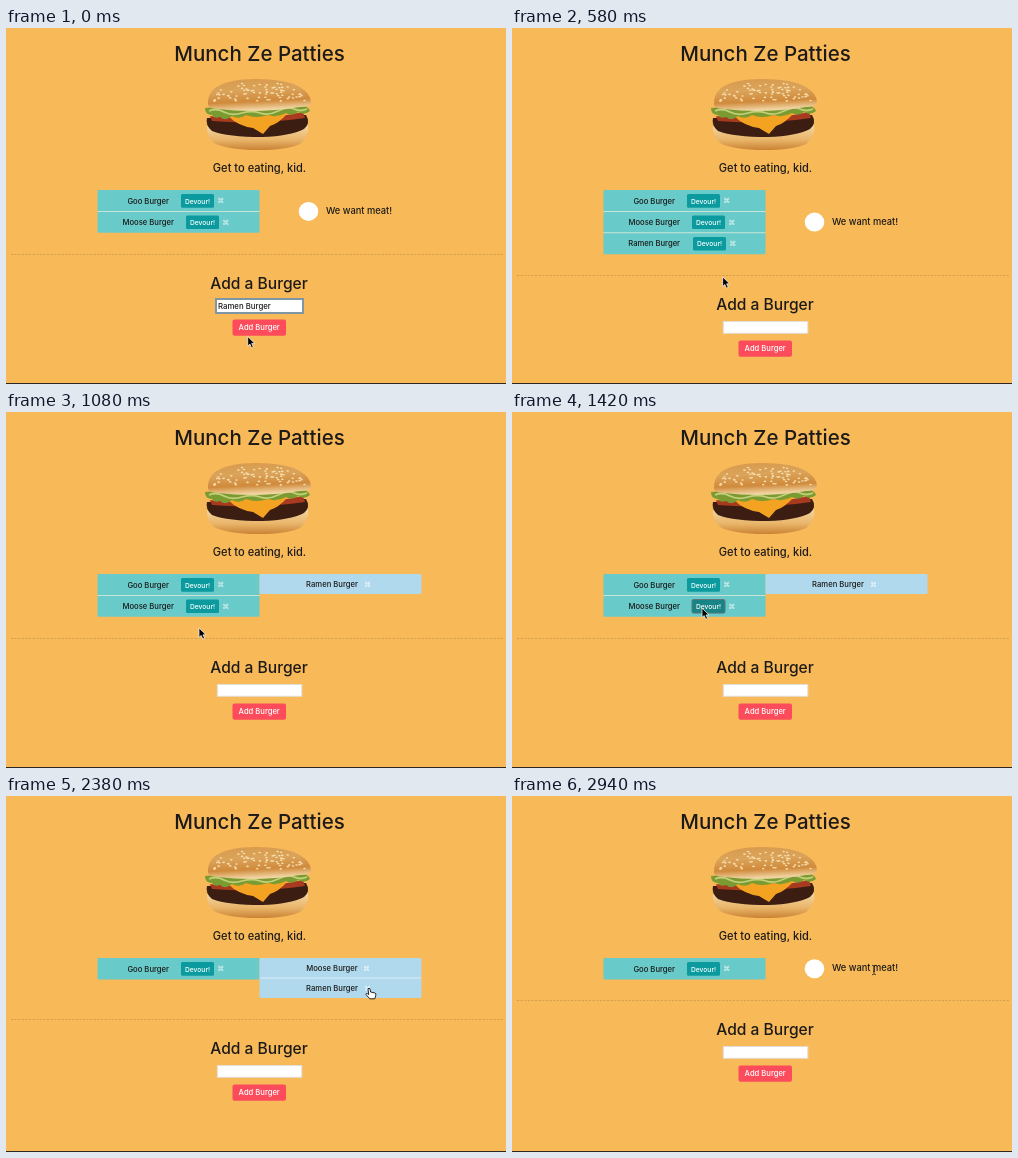
An HTML page that plays this animation: 500x356 px, repeating every 2960 ms.

```html
<!DOCTYPE html>
<html lang="en">
<head>
<meta charset="utf-8">
<title>Burger list</title>
<style>
html, body { margin: 0; width: 100%; height: 100%; overflow: hidden; background: #f8b959; }
svg { display: block; width: 500px; height: 356px; font-family: Inter, sans-serif; font-weight: 500; fill: #1c1a18; }
</style>
</head>
<body>
<svg viewBox="0 0 500 356">
  <defs>
    <linearGradient id="crown" x1="0" y1="0" x2=".15" y2="1">
      <stop offset="0" stop-color="#d79a4c"/>
      <stop offset=".4" stop-color="#dba45a"/>
      <stop offset=".75" stop-color="#d08a3c"/>
      <stop offset="1" stop-color="#f0d3a0"/>
    </linearGradient>
    <linearGradient id="heel" x1="0" y1="0" x2="0" y2="1">
      <stop offset="0" stop-color="#f3d7a4"/>
      <stop offset=".6" stop-color="#e9b468"/>
      <stop offset="1" stop-color="#c98235"/>
    </linearGradient>
    <path id="arrow" d="M0 0V9.6L2.2 7.6 3.8 11.2 5.6 10.4 4 6.9H7Z" fill="#000" stroke="#fff" stroke-width=".7"/>
    <path id="hand" d="M-1 .8Q0-.4 1 .8L1.6 4 6 5Q7.3 5.4 6.8 7.2L5.8 10.8H.8L-3 6.6Q-3 5 -1.6 5.6L-.3 6.6Z" fill="#fff" stroke="#111" stroke-width=".9"/>
    <path id="beam" d="M-2-4.7Q0-4.7 0-3.5Q0-4.7 2-4.7M0-3.5V3.5M-2 4.7Q0 4.7 0 3.5Q0 4.7 2 4.7M-1 1.5H1" fill="none" stroke="#222" stroke-width=".8"/>
  </defs>
  <rect width="500" height="356" fill="#f8b959"/>
  <rect y="355" width="500" height="1" fill="#2b2721"/>
  <text x="253.5" y="33.2" font-size="20.5" text-anchor="middle">Munch Ze Patties</text>
  <text x="253.5" y="143.6" font-size="11.1" text-anchor="middle">Get to eating, kid.</text>
  <g id="burger">
    <path d="M201 98Q252 112 302 97Q304 108 294 116Q280 122 252 122Q222 122 208 115Q200 108 201 98Z" fill="url(#heel)"/>
    <path d="M201 90L300 87Q305 95 298 101Q284 108 256 109Q222 109 206 103Q199 97 201 90Z" fill="#3b1d12"/>
    <path d="M204 88Q250 94 297 84L299 90Q250 97 206 93Z" fill="#a83a1f"/>
    <path d="M222 88L282 85Q272 96 264 98L257 106 247 100Q232 98 222 88Z" fill="#f3a321"/>
    <path d="M199 80Q215 78 230 80L292 75Q302 78 304 83Q298 88 292 84Q286 89 280 85Q270 90 262 87Q250 91 240 87Q233 92 226 88Q220 94 214 89Q208 91 206 87Q199 87 199 80Z" fill="#7a9a32"/>
    <path d="M203 83Q210 80 218 84T236 85 254 85 272 83 288 81 301 81" fill="none" stroke="#c2d079" stroke-width="1.8"/>
    <path d="M202 77Q201 67 209 60Q222 51 250 51Q280 51 294 59Q305 66 305 74Q304 79 294 79Q252 86 212 81Q203 81 202 77Z" fill="url(#crown)"/>
  </g>
  <g id="page"></g>
</svg>
<script>
const DURATION = 2960, TOP = 162;
const page = document.getElementById('page');
const GOO = { name: 'Goo Burger', x: 175 };
const MOOSE = { name: 'Moose Burger', x: 180 };
const RAMEN = { name: 'Ramen Burger', x: 181 };

// End time, waiting burgers, eaten burgers
const states = [
  [160, [GOO, MOOSE], []],
  [940, [GOO, MOOSE, RAMEN], []],
  [1500, [GOO, MOOSE], [RAMEN]],
  [2470, [GOO], [MOOSE, RAMEN]],
  [2790, [GOO], [MOOSE]],
  [DURATION, [GOO], []]
];

// Time, x, y, pointer shape
const pointer = [
  [0, 241.7, 308.5, 'arrow'], [180, 241, 307, 'beam'], [320, 238, 303, 'beam'],
  [430, 233, 290, 'arrow'], [680, 196, 222, 'hand'], [760, 193, 216, 'hand'],
  [940, 193, 216, 'arrow'], [1080, 193, 216, 'arrow'], [1240, 191, 199, 'hand'],
  [1360, 190, 196, 'arrow'], [1540, 190, 196, 'arrow'], [1940, 297, 193, 'arrow'],
  [2240, 357, 192, 'hand'], [2340, 363, 192, 'hand'], [2470, 363, 192, 'arrow'],
  [2600, 362, 178, 'hand'], [2680, 362, 174, 'hand'], [2790, 362, 174, 'beam'],
  [DURATION, 362, 174, 'beam']
];

const rect = (x, y, w, h, fill, extra = '') =>
  `<rect x="${x}" y="${y}" width="${w}" height="${h}" fill="${fill}" ${extra}/>`;
const text = (s, x, mid, size, extra = 'text-anchor="middle"') =>
  `<text x="${x}" y="${mid + size * .36}" font-size="${size}" ${extra}>${s}</text>`;
const remove = (x, mid) =>
  text('⌘', x, mid, 7, 'text-anchor="middle" fill="#fff" fill-opacity=".85" font-family="DejaVu Sans, sans-serif"');
const rowLine = (x, y) => rect(x, y - .4, 162, .8, '#fff', 'fill-opacity=".65"');

function sesame() {
  let seed = 7, seeds = '';
  const random = () => (seed = seed * 16807 % 2147483647) / 2147483647;
  for (let i = 0; i < 75; i++) {
    const a = Math.PI * (1 + random()), r = Math.sqrt(random()) * .95;
    const x = 253 + 49 * r * Math.cos(a), y = 73 + 21 * r * Math.sin(a);
    seeds += `<ellipse cx="${x}" cy="${y}" rx="1.3" ry=".8" fill="#f6dfb0"/>`;
  }
  document.getElementById('burger').innerHTML += seeds;
}

function cursorAt(t) {
  const i = pointer.findIndex(p => p[0] > t);
  const [t0, x0, y0, shape] = pointer[i - 1], [t1, x1, y1] = pointer[i];
  const k = (t - t0) / (t1 - t0);
  return { x: x0 + (x1 - x0) * k, y: y0 + (y1 - y0) * k, shape };
}

function waitingRow(burger, i, cursor) {
  const y = TOP + 21.4 * i, mid = y + 10.9, { name, x } = burger;
  const hover = cursor.x > x && cursor.x < x + 33 && Math.abs(cursor.y - mid) < 7;
  const button = hover
    ? rect(x, mid - 6.8, 33, 13.6, '#188486', 'rx="1.5" stroke="#61777b"')
    : rect(x, mid - 6.8, 33, 13.6, '#0b9b9f', 'rx="1.5"');
  return rect(91.5, y, 162, 21.4, '#68cac9', 'rx="1"') + (i ? rowLine(91.5, y) : '') +
    text(name, 142.2, mid, 7.65) + button +
    text('Devour!', x + 16.5, mid + .3, 6.7, 'text-anchor="middle" fill="#fff"') +
    remove(x + 39.7, mid);
}

function eatenRow(burger, i) {
  const y = TOP + 20 * i, mid = y + 10.7;
  return rect(253.5, y, 162, 20, '#b0d9ee', 'rx="1.5"') + (i ? rowLine(253.5, y) : '') +
    text(burger.name, 326, mid, 7.65) + remove(burger === RAMEN ? 361.5 : 360.5, mid);
}

function form(y, typing) {
  const input = typing
    ? rect(210, y + 44.5, 87, 14, '#fff', 'stroke="#7f96a5" stroke-width="2"') +
      text('Ramen Burger', 212, y + 51.7, 7.8, '')
    : rect(211.3, y + 46, 84.5, 11.8, '#fff', 'stroke="#e3ddd3"');
  return `<path d="M5 ${y}H498" stroke="#d49f4d" stroke-dasharray="2.2 1.4"/>` +
    text('Add a Burger', 253, y + 29, 15.6) + input +
    rect(226.5, y + 65, 53.5, 16.3, '#fc4c5c', 'rx="2"') +
    text('Add Burger', 253.2, y + 73.2, 7.6, 'text-anchor="middle" fill="#fff"');
}

function draw() {
  const t = performance.now() % DURATION;
  const [end, waiting, eaten] = states.find(s => t < s[0]);
  const cursor = cursorAt(t);
  const height = Math.max(21.4 * waiting.length, 20 * eaten.length);
  const mid = TOP + height / 2;
  const notice = `<ellipse cx="302.5" cy="${mid}" rx="9.8" ry="9.5" fill="#fff"/>` +
    text('We want meat!', 320, mid - .6, 9.3, '');
  page.innerHTML = waiting.map((b, i) => waitingRow(b, i, cursor)).join('') +
    (eaten.length ? eaten.map(eatenRow).join('') : notice) +
    form(Math.floor(TOP + height + 21.5) + .5, end === states[0][0]) +
    `<use href="#${cursor.shape}" x="${cursor.x}" y="${cursor.y}"/>`;
  requestAnimationFrame(draw);
}

sesame();
draw();
</script>
</body>
</html>
```
